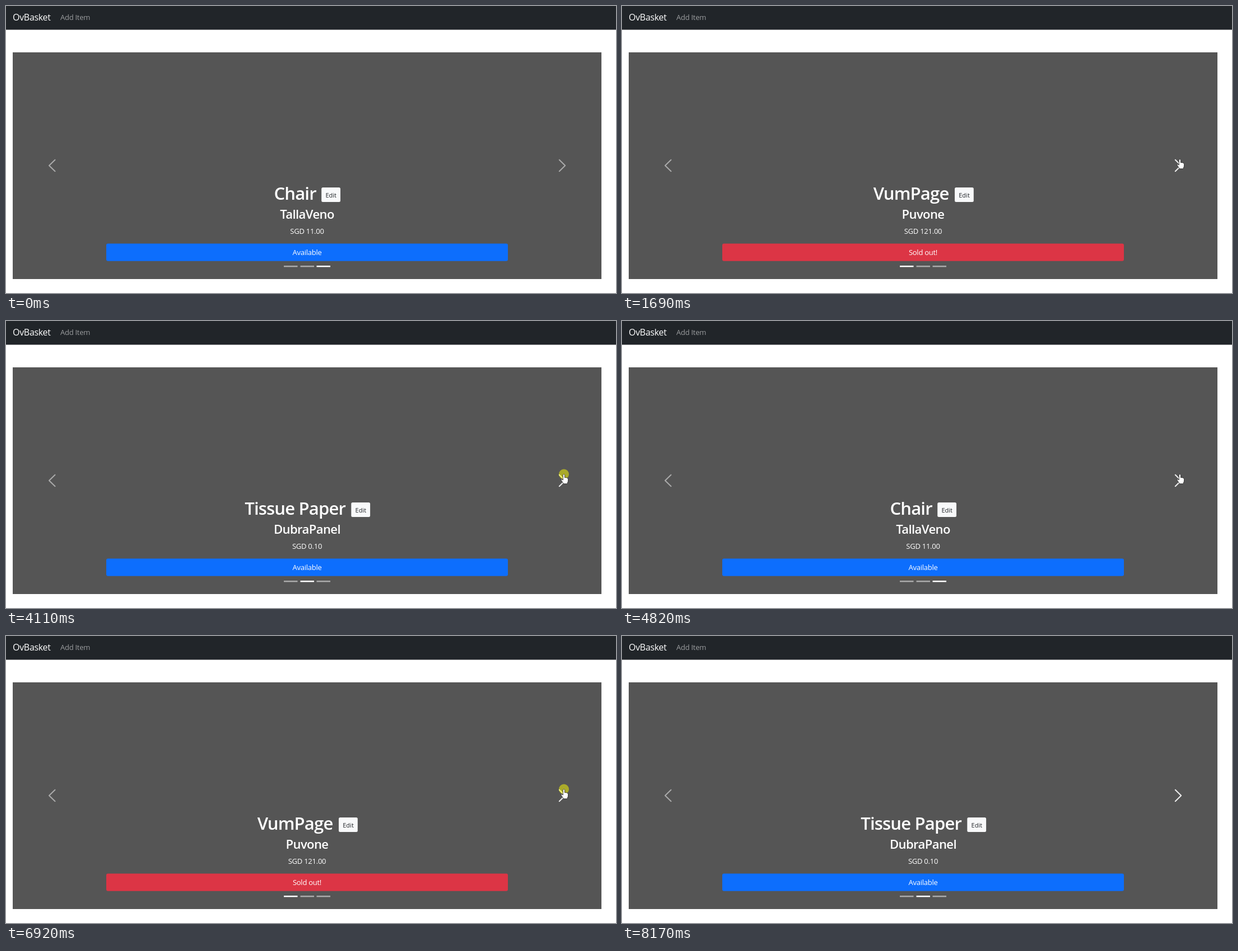
These frames come from a looping animation (1089x514 px, 8500 ms). An HTML page:

```html
<!DOCTYPE html>
<html lang="en">
<head>
<meta charset="utf-8">
<title>Item carousel</title>
<style>
  html, body { margin: 0; width: 100%; height: 100%; overflow: hidden; background: #fff; }
  svg { display: block; width: 1089px; height: 514px; }
  text { font: 13px "Open Sans", "Noto Sans", sans-serif; letter-spacing: -.02em; fill: #fff; }
  .mid { text-anchor: middle; }
  .brand { font-size: 16px; }
  .link { fill: #9b9d9f; }
  .title { font-size: 31px; font-weight: 600; letter-spacing: -.026em; }
  .maker { font-size: 22px; font-weight: 600; letter-spacing: -.026em; }
  .edit { font-size: 11px; letter-spacing: 0; fill: #212529; }
  .arrow { fill: none; stroke: #fff; stroke-width: 2; stroke-linecap: round; stroke-linejoin: round; opacity: .5; }
</style>
</head>
<body>
<svg viewBox="0 0 1089 514">
  <rect width="1089" height="42.5" fill="#212529"/>
  <text class="brand" x="12" y="26">OvBasket</text>
  <text class="link" x="97" y="25">Add Item</text>
  <g id="slides"></g>
  <g id="dots" fill="#fff">
    <rect x="496" y="465" width="24.5" height="2.5"/>
    <rect x="525.5" y="465" width="24.5" height="2.5"/>
    <rect x="554.5" y="465" width="24.5" height="2.5"/>
  </g>
  <path class="arrow" d="M87.5 275.5L77 285.8L87.5 296"/>
  <path class="arrow" id="next" d="M987.8 275.5L998.2 285.8L987.8 296"/>
  <circle id="click" cx="996" cy="274.3" r="9" fill="#ff0" opacity=".5"/>
  <g id="cursor" fill="#fff" stroke="#222" stroke-width=".8" stroke-linejoin="round">
    <path id="hand" d="M-1.7 1.2C-1.7-1 1.5-1 1.5 1.2V5.5C4 5 7.5 6 7.5 8.5V12L5.8 16.5H-.5L-4.6 10.5C-5.5 9-3.5 8-2.5 9L-1.7 10Z"/>
    <path id="pointer" d="M0 0V15.5L3.6 12.2L6 17.5L8.4 16.4L6 11.3H11Z"/>
  </g>
</svg>
<script>
  const LOOP = 8500, STEP = 70;
  const $ = id => document.getElementById(id);
  const show = (el, on) => el.setAttribute('visibility', on ? 'visible' : 'hidden');
  const clamp = v => Math.min(1, Math.max(0, v));
  const mix = (a, b, k) => a + (b - a) * k;

  const bezier = (x1, y1, x2, y2) => x => {
    const at = (a, b, u) => 3 * a * u * (1 - u) ** 2 + 3 * b * u * u * (1 - u) + u ** 3;
    let lo = 0, hi = 1;
    for (let i = 0; i < 20; i++) {
      const u = (lo + hi) / 2;
      if (at(x1, x2, u) < x) lo = u; else hi = u;
    }
    return at(y1, y2, lo);
  };
  const ease = bezier(.25, .1, .25, 1);
  const easeInOut = bezier(.42, 0, .58, 1);

  // editX is the left edge of the Edit button; the title ends just before it
  const items = [
    { title: 'VumPage', maker: 'Puvone', price: '121.00', editX: 594, sold: true },
    { title: 'Tissue Paper', maker: 'DubraPanel', price: '0.10', editX: 616.3 },
    { title: 'Chair', maker: 'TallaVeno', price: '11.00', editX: 563.2 }
  ];
  $('slides').innerHTML = items.map(it => `<g>
    <rect x="12" y="83" width="1051" height="406" fill="#555"/>
    <text class="title mid" x="${(1075 - 43) / 2}" y="346.5">${it.title}</text>
    <rect x="${it.editX}" y="325" width="33.8" height="26" rx="2.5" fill="#f8f9fa"/>
    <text class="edit mid" x="${it.editX + 17}" y="343">Edit</text>
    <text class="maker mid" x="537.5" y="381">${it.maker}</text>
    <text class="mid" x="537.5" y="408">SGD ${it.price}</text>
    <rect x="179" y="425.5" width="717" height="31.2" rx="3" fill="${it.sold ? '#dc3545' : '#0d6efd'}"/>
    <text class="mid" x="537.5" y="446">${it.sold ? 'Sold out!' : 'Available'}</text>
  </g>`).join('');
  const slides = [...$('slides').children];
  const dots = [...$('dots').children];

  // click time, delay before the fade
  const clicks = [[990, 75], [2550, 75], [4110, 75], [5550, 40], [6920, 75]];
  const held = (t, from) => Math.floor((t - from) / STEP) * STEP;

  function drawSlides(t) {
    const n = clicks.filter(c => t >= c[0]).length;
    const now = (n + 2) % 3, before = (n + 1) % 3;
    let dt = 1e4, delay = 0;
    if (n) {
      dt = held(t, clicks[n - 1][0]);
      delay = clicks[n - 1][1];
    }
    const k = clamp((dt - delay) / 600);
    $('slides').append(slides[before], slides[now]);
    slides.forEach((s, i) => {
      show(s, i === now || i === before);
      s.setAttribute('opacity', i === now ? easeInOut(k) : 1);
    });
    dots.forEach((d, i) => {
      const e = ease(k);
      d.setAttribute('opacity', i === now ? mix(.5, 1, e) : i === before ? mix(1, .5, e) : .5);
    });
    show($('click'), n > 0 && dt < 3 * STEP);
  }

  function drawCursor(t) {
    let x = 996, y = 275;
    if (t < 790) {
      const k = clamp(held(t, 300) / 420), e = 1 - (1 - k) ** 2;
      x = mix(1067, x, e);
      y = mix(503, y, e);
    } else if (t >= 7820) {
      const k = clamp((held(t, 7820) + STEP) / 350) ** 1.6;
      x = mix(x, 1034, k);
      y = mix(y, 493, k);
    }
    const inside = x < 1063 && y < 489;
    const on = t >= 300 && t < 8170;
    $('cursor').setAttribute('transform', `translate(${x} ${y})`);
    show($('hand'), on && inside);
    show($('pointer'), on && !inside);
    const hover = t < 300 ? 0 : ease(clamp((held(t, 300) - 140) / 150));
    $('next').style.opacity = mix(.5, .9, hover);
  }

  function frame() {
    const t = performance.now() % LOOP;
    drawSlides(t);
    drawCursor(t);
    requestAnimationFrame(frame);
  }

  // centre each title in the gap left of its button
  slides.forEach((s, i) => {
    const left = 1075 - items[i].editX - 33.8;
    s.querySelector('.title').setAttribute('x', (left + items[i].editX - 9) / 2);
  });
  frame();
</script>
</body>
</html>
```
